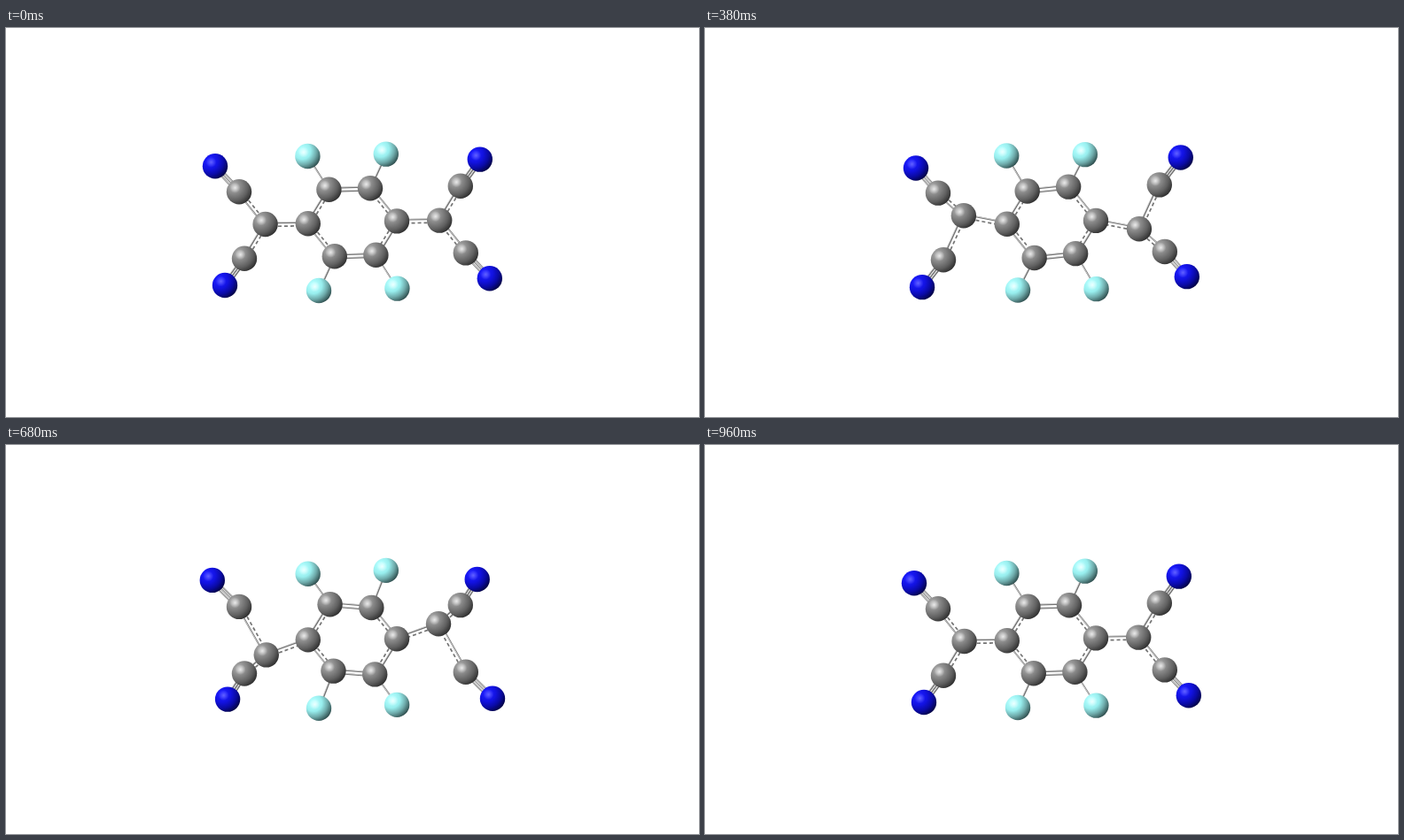
Recreate the animation shown at these times as an HTML page with a canvas. Size 782x440 px, loop 0.98 s.

```html
<!DOCTYPE html>
<html lang="en">
<head>
<meta charset="utf-8">
<style>
  html, body { margin: 0; width: 100%; height: 100%; overflow: hidden; background: #fff; }
  canvas { display: block; }
</style>
</head>
<body>
<canvas id="stage" width="782" height="440"></canvas>
<script>
const ctx = document.getElementById('stage').getContext('2d');
const STEP = 20, LOOP = 980, RADIUS = 14.2;
const CENTER = { x: 390.9, y: 219.8 };

// Half of the molecule: [element, x, y, swing x, swing y]
const half = [
  ['N', 236, 156.3, 3.3, 3.5],
  ['N', 247, 291, -3.2, 3.5],
  ['C', 263, 185.2, 0, 2.4],
  ['C', 269, 260.8, 0, 2.4],
  ['C', 292.6, 222, -1.2, -15.9],
  ['C', 340.8, 221.2, 0, .9],
  ['C', 364.4, 182.8, -1.2, 2.7],
  ['C', 370.8, 258.3, 1.4, 2.8],
  ['F', 340.4, 145, -.3, -.8],
  ['F', 353, 297, 0, -.8]
];
// The other half is the point reflection, swinging the opposite way
const atoms = half.concat(half.map(([el, x, y, dx, dy]) =>
  [el, 2 * CENTER.x - x, 2 * CENTER.y - y, -dx, -dy]));

// [from, to, kind, side of the dashed strand]
const bonds = [
  [0, 2, 'triple'], [1, 3, 'triple'], [10, 12, 'triple'], [11, 13, 'triple'],
  [2, 4, 'dashed', -1], [3, 4, 'dashed', 1],
  [12, 14, 'dashed', -1], [13, 14, 'dashed', -1],
  [4, 5, 'dashed', 1], [14, 15, 'dashed', -1],
  [5, 6, 'dashed', 1], [5, 7, 'dashed', -1],
  [15, 16, 'dashed', 1], [15, 17, 'dashed', -1],
  [6, 17, 'double'], [7, 16, 'double'],
  [6, 8, 'single'], [7, 9, 'single'], [16, 18, 'single'], [17, 19, 'single']
];

// Diffuse tones from the lit side to the shadow, then the glint
const shades = {
  C: { tones: ['#a6a6a6', '#828282', '#606060', '#2c2c2c'], glint: '255,255,255' },
  N: { tones: ['#1c1cff', '#1212e0', '#0a0aa4', '#020240'], glint: '120,120,255' },
  F: { tones: ['#b4ffff', '#98eeee', '#6eaaaa', '#2c4a4a'], glint: '255,255,255' }
};

function line(a, b, width, color, dash = []) {
  ctx.beginPath();
  ctx.moveTo(a.x, a.y);
  ctx.lineTo(b.x, b.y);
  ctx.setLineDash(dash);
  ctx.lineWidth = width;
  ctx.strokeStyle = color;
  ctx.stroke();
}

// A thin rod beside the axis a-b, lit from the upper left
function strand(a, b, offset, dash) {
  const length = Math.hypot(b.x - a.x, b.y - a.y);
  const nx = -(b.y - a.y) / length * offset, ny = (b.x - a.x) / length * offset;
  const shifted = (p, d) => ({ x: p.x + nx + d, y: p.y + ny + d });
  line(shifted(a, .3), shifted(b, .3), 1.7, '#747474', dash);
  if (!dash) line(shifted(a, -.4), shifted(b, -.4), .9, '#d4d4d4');
}

function drawBond(a, b, kind, side) {
  if (kind === 'triple') {
    for (const offset of [-2.6, 0, 2.6]) strand(a, b, offset);
  } else if (kind === 'double') {
    for (const offset of [-2, 2]) strand(a, b, offset);
  } else if (kind === 'dashed') {
    strand(a, b, -side * 1.7);
    strand(a, b, side * 2.2, [4, 3]);
  } else {
    strand(a, b, 0);
  }
}

function drawAtom({ el, x, y }) {
  const { tones, glint } = shades[el];
  const lit = ctx.createRadialGradient(x - 6, y - 6, 0, x - 6, y - 6, RADIUS + 8.5);
  [.12, .42, .7, 1].forEach((stop, i) => lit.addColorStop(stop, tones[i]));
  const spot = ctx.createRadialGradient(x - 4.5, y - 4.5, 0, x - 4.5, y - 4.5, 6);
  spot.addColorStop(0, `rgba(${glint},.75)`);
  spot.addColorStop(1, `rgba(${glint},0)`);
  ctx.beginPath();
  ctx.arc(x, y, RADIUS, 0, 2 * Math.PI);
  for (const fill of [lit, spot]) {
    ctx.fillStyle = fill;
    ctx.fill();
  }
}

function draw(now) {
  const swing = Math.sin(2 * Math.PI * Math.floor(now % LOOP / STEP) / 48);
  const posed = atoms.map(([el, x, y, dx, dy]) => ({ el, x: x + dx * swing, y: y + dy * swing }));
  ctx.fillStyle = '#fff';
  ctx.fillRect(0, 0, 782, 440);
  for (const [from, to, kind, side] of bonds) drawBond(posed[from], posed[to], kind, side);
  posed.forEach(drawAtom);
}

const start = performance.now();
function tick() {
  draw(performance.now() - start);
  requestAnimationFrame(tick);
}
tick();
</script>
</body>
</html>
```
